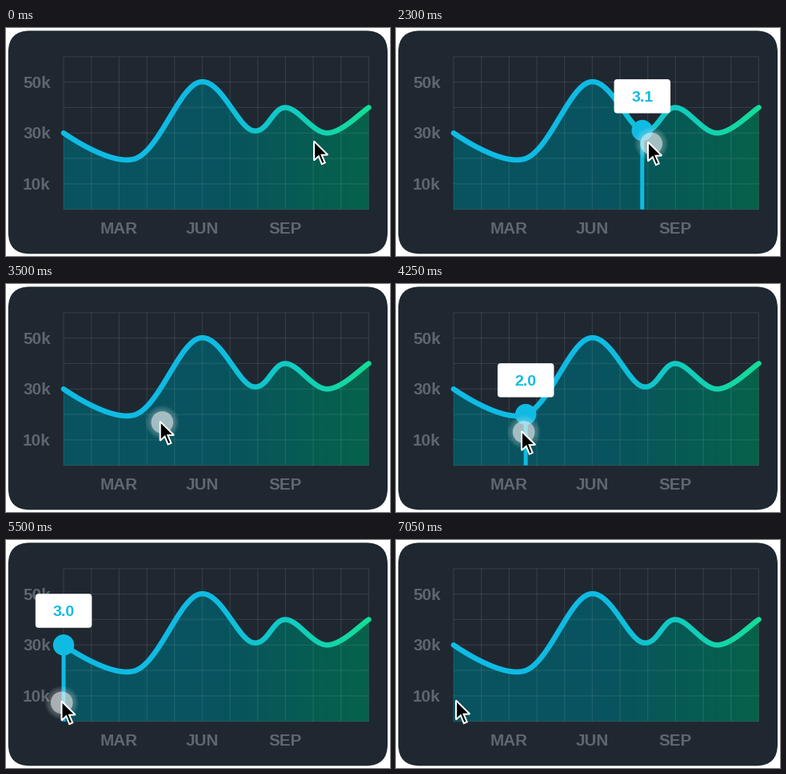
Recreate the animation shown at these times as a matplotlib script. Size 480 px wide and 285 px high, loop 7100 ms.

```python
import numpy as np
import matplotlib.pyplot as plt
from matplotlib.animation import FuncAnimation
from matplotlib.collections import LineCollection
from matplotlib.colors import to_rgb
from matplotlib.patches import Circle, FancyBboxPatch, Polygon
from matplotlib.path import Path

W, H, DPI = 480, 285, 100
STEP, LOOP = 50, 7100
PT = 72 / DPI  # points per pixel

CARD, LABEL = "#1f2831", "#5e6770"
CYAN, GREEN = "#10bbe3", "#14dd98"
FILL_L, FILL_R = "#08535f", "#06624a"

LEFT, RIGHT, TOP, BOTTOM = 72, 453.4, 35.8, 226.7
SPOTS = np.array([(0, 3), (2.6, 2), (4.9, 5), (6.8, 3.1), (8, 4), (9.5, 3), (11, 4)])
SMOOTH, REACH = 0.35, 10

# Pointer path: time, x, y
KEYS = np.array([
    (0, 384, 139.5), (150, 390, 141), (850, 390, 141), (1150, 349.5, 138),
    (1250, 347.5, 138), (1750, 343, 147), (1950, 343, 147), (2300, 314, 140.5),
    (2750, 264, 153), (2850, 261.5, 155), (3400, 198, 168), (4250, 156, 182),
    (4900, 93, 197), (5300, 68.5, 199.5), (5850, 68.5, 199.5),
    (6500, 74, 198.5), (LOOP, 74, 198.5),
])
RELEASE = 6000
ARROW = np.array([(1, 2), (1, 26), (6.8, 20.7), (10.8, 30.6),
                  (14.7, 28.9), (10.6, 19.2), (18.2, 19)])


def to_px(p):
    p = np.asarray(p, float)
    return np.stack([LEFT + p[..., 0] * (RIGHT - LEFT) / 11,
                     BOTTOM - p[..., 1] * (BOTTOM - TOP) / 6], axis=-1)


def smooth_curve(pts, n=50):
    """Cubic Bezier chain through pts."""
    out, lead = [pts[:1]], np.zeros(2)
    s = np.linspace(0, 1, n + 1)[1:, None]
    for i in range(1, len(pts)):
        a, b = pts[i - 1], pts[i]
        c = pts[min(i + 1, len(pts) - 1)]
        c1 = a + lead
        lead = (c - a) / 2 * SMOOTH
        c2 = b - lead
        out.append((1 - s) ** 3 * a + 3 * s * (1 - s) ** 2 * c1
                   + 3 * s ** 2 * (1 - s) * c2 + s ** 3 * b)
    return np.vstack(out)


def monotone_slopes(t, v):
    d = np.diff(v) / np.diff(t)
    a, b = d[:-1], d[1:]
    same = a * b > 0
    mid = np.where(same, 2 * a * b / np.where(same, a + b, 1), 0)
    return np.concatenate([[d[0]], mid, [0]])


TIMES = KEYS[:, 0]
SLOPES = [monotone_slopes(TIMES, KEYS[:, k]) for k in (1, 2)]


def pointer(t):
    t = np.clip(t, 0, LOOP - 1)
    i = np.searchsorted(TIMES, t, side="right") - 1
    h = TIMES[i + 1] - TIMES[i]
    s = (t - TIMES[i]) / h
    pos = []
    for k, m in enumerate(SLOPES, 1):
        a, b = KEYS[i, k], KEYS[i + 1, k]
        pos.append(a + (b - a) * s * s * (3 - 2 * s)
                   + h * s * (1 - s) * (m[i] * (1 - s) - m[i + 1] * s))
    return np.array(pos)


def press(t):
    """Strength of the touch mark, 0 to 1."""
    return float(np.clip(min(t / 150, 1 - (t - RELEASE) / 150), 0, 1))


fig = plt.figure(figsize=(W / DPI, H / DPI), dpi=DPI, facecolor="white")
ax = fig.add_axes([0, 0, 1, 1])
ax.axis("off")


def box(x, y, w, h, r, color, z):
    return ax.add_patch(FancyBboxPatch(
        (x, y), w, h, boxstyle=f"round,pad=0,rounding_size={r}",
        fc=color, ec="none", zorder=z))


def label(x, y, s, size=20.7, color=LABEL, z=2):
    return ax.text(x, y, s, fontsize=size * PT, color=color, weight="bold",
                   family="Liberation Sans", ha="center", va="baseline", zorder=z)


def gradient(outline, c0, c1, z):
    """Flat up to the middle of the chart, then blending to the right edge."""
    x0, x1 = LEFT - 4, RIGHT + 4
    x = np.linspace(x0, x1, 390)
    k = np.clip((x - LEFT) / (RIGHT - LEFT) * 2 - 1, 0, 1)[:, None]
    rgb = (1 - k) * np.array(to_rgb(c0)) + k * np.array(to_rgb(c1))
    im = ax.imshow(rgb[None], extent=(x0, x1, H, 0), aspect="auto",
                   interpolation="bilinear", zorder=z)
    im.set_clip_path(Path(outline), transform=ax.transData)


def band(pts, r):
    """Outline of a round-capped stroke of radius r."""
    d = np.gradient(pts, axis=0)
    d /= np.linalg.norm(d, axis=1)[:, None]
    nrm = np.stack([-d[:, 1], d[:, 0]], axis=1)
    a = np.linspace(0, np.pi, 14)[:, None]
    end = pts[-1] + r * (np.cos(a) * nrm[-1] + np.sin(a) * d[-1])
    start = pts[0] - r * (np.cos(a) * nrm[0] + np.sin(a) * d[0])
    return np.vstack([pts + r * nrm, end, (pts - r * nrm)[::-1], start])


# Static chart
box(2.8, 3.4, 474.2, 278.9, 27, CARD, 0)
spots = to_px(SPOTS)
curve = smooth_curve(spots)
gradient(np.vstack([curve, [(RIGHT, BOTTOM), (LEFT, BOTTOM)]]), FILL_L, FILL_R, 1)

xs = np.linspace(LEFT, RIGHT, 12)
ys = np.linspace(TOP, BOTTOM, 7)
grid = [[(x, TOP), (x, BOTTOM)] for x in xs] + [[(LEFT, y), (RIGHT, y)] for y in ys]
ax.add_collection(LineCollection(grid, colors=[(1, 1, 1, 0.09)],
                                 linewidths=1.2 * PT, snap=False, zorder=2))
gradient(band(curve, 3.3), CYAN, GREEN, 3)

for v, s in ((5, "50k"), (3, "30k"), (1, "10k")):
    label(38.6, to_px((0, v))[1] + 7.1, s)
for v, s in ((2, "MAR"), (5, "JUN"), (8, "SEP")):
    label(to_px((v, 0))[0], 256.9, s)

# Touched spot
stem, = ax.plot([], [], color=CYAN, lw=5 * PT, solid_capstyle="butt",
                snap=False, zorder=4)
dot = ax.add_patch(Circle((0, 0), 13.2, fc=CYAN, ec="none", zorder=5))
tip = box(0, 0, 70.5, 42.5, 4, "white", 6)
value = label(0, 0, "", 19.5, CYAN, 7)
marker = (stem, dot, tip, value)

# Touch mark and pointer
RINGS = [(r, 0.05) for r in np.arange(15, 22, 1.2)] + [(13.8, 0.56)]
rings = [ax.add_patch(Circle((0, 0), r, fc="#eef2f4", ec="none", zorder=8))
         for r, _ in RINGS]
arrow = ax.add_patch(Polygon(ARROW, closed=True, fc="black", ec="white",
                             lw=2 * PT, joinstyle="miter", zorder=9))

ax.set_xlim(0, W)
ax.set_ylim(H, 0)


def draw(n):
    t = n * STEP
    pos = pointer(t)
    arrow.set_xy(pos + ARROW)

    p = press(t)
    center = pointer(t - 40) + (1.2, 3.8)
    for ring, (r, alpha) in zip(rings, RINGS):
        ring.center = center
        ring.set_radius(r * (0.6 + 0.4 * p))
        ring.set_alpha(alpha * p)

    gap = np.abs(spots[:, 0] - pos[0])
    i = int(gap.argmin())
    on = bool(0 < t < RELEASE and gap[i] <= REACH)
    for a in marker:
        a.set_visible(on)
    if on:
        x, y = spots[i]
        stem.set_data([x, x], [y, BOTTOM])
        dot.center = (x, y)
        tip.set_x(x - 35.2)
        tip.set_y(y - 64)
        value.set_position((x + 0.2, y - 35.8))
        value.set_text(f"{SPOTS[i, 1]:.1f}")
    return [arrow, *rings, *marker]


anim = FuncAnimation(fig, draw, frames=LOOP // STEP, interval=STEP, repeat=True)
plt.show()
```
